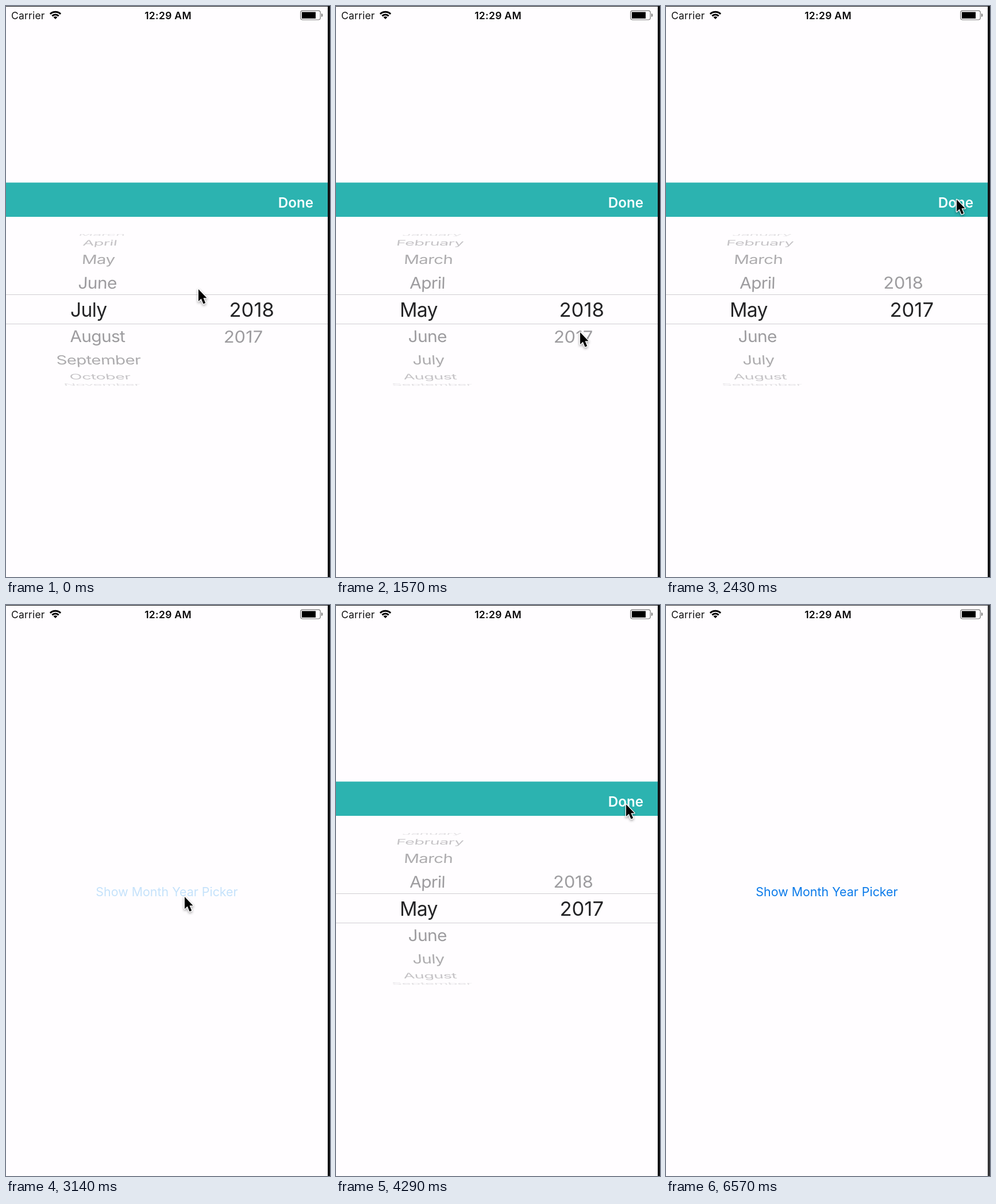
Write an HTML page with a canvas that moves like this. It is 564 by 994 pixels and loops after 7570 ms.

```html
<!DOCTYPE html>
<html lang="en">
<head>
<meta charset="utf-8">
<title>Month Year Picker</title>
<style>
  html, body { margin: 0; width: 100%; height: 100%; overflow: hidden; background: #fffdff; }
  canvas { display: block; width: 564px; height: 994px; }
</style>
</head>
<body>
<canvas id="stage" width="564" height="994"></canvas>
<script>
const ctx = document.getElementById('stage').getContext('2d');
const LOOP = 7570;
const FONT = 'Inter, "Open Sans", sans-serif';
const MONTHS = Array.from({ length: 12 }, (_, i) =>
  new Date(2018, i).toLocaleString('en-US', { month: 'long' }));
const YEARS = ['2018', '2017'];

// Wheel geometry
const MID = 528.5, RADIUS = 131, ROW = 20.9 * Math.PI / 180;
const BAND = { top: 502, bottom: 553 };

// When the hand grabs and lets go of each wheel
const MONTH_DRAG = [430, 1140], YEAR_DRAG = [1570, 2140];

const HOME = { x: 335, y: 493 };
const MOVES = [
  { from: 140, to: 430, x: 245, y: 482 },    // to the months
  { from: 430, to: 1140, x: 267, y: 577 },   // drag down
  { from: 1140, to: 1570, x: 425, y: 568 },  // to the years
  { from: 1570, to: 2000, x: 434, y: 505 },  // drag up
  { from: 2000, to: 2430, x: 506, y: 337 },  // Done
  { from: 2570, to: 3140, x: 311, y: 508 },  // open again
  { from: 3430, to: 4290, x: 505, y: 347 }   // Done
];

const mix = (a, b, p) => a + (b - a) * p;

function ease(t, from, to) {
  const p = Math.min(1, Math.max(0, (t - from) / (to - from)));
  return p * p * (3 - 2 * p);
}

function pointerAt(t) {
  return MOVES.reduce((at, m) => {
    const p = ease(t, m.from, m.to);
    return { x: mix(at.x, m.x, p), y: mix(at.y, m.y, p) };
  }, HOME);
}

// The picture advances seven times per second, on whole 10 ms.
function hold(t) {
  const at = n => Math.round(n * 100 / 7) * 10;
  const n = Math.floor((t + 5) * 7 / 1000);
  return at(n) > t ? at(n - 1) : at(n);
}

function text(str, x, y, size, color, { weight = 400, align = 'center', spacing = 0 } = {}) {
  ctx.font = `${weight} ${size}px ${FONT}`;
  ctx.textAlign = align;
  ctx.letterSpacing = spacing + 'px';
  ctx.fillStyle = color;
  ctx.fillText(str, x, y);
}

function rect(x, y, w, h, color) {
  ctx.fillStyle = color;
  ctx.fillRect(x, y, w, h);
}

function clipped(spans, draw) {
  ctx.save();
  ctx.beginPath();
  spans.forEach(([top, bottom]) => ctx.rect(0, top, 560, bottom - top));
  ctx.clip();
  draw();
  ctx.restore();
}

function wheel(items, pos, { x, axis, size, spacing }) {
  const eachRow = (reach, paint) => items.forEach((label, i) => {
    if (Math.abs(i - pos) > reach) return;
    const a = (i - pos) * ROW;
    ctx.save();
    const color = paint(Math.sin(a), Math.cos(a));
    text(label, 0, size * 0.364, size, color, { spacing });
    ctx.restore();
  });

  // Rows on the drum shrink towards the axis and fade as they turn away.
  clipped([[397, BAND.top], [BAND.bottom, 661]], () => eachRow(4.25, (sin, cos) => {
    const k = 0.823 + 0.068 * cos, arm = x - axis;
    const shear = -arm * 0.068 * sin / RADIUS;
    ctx.transform(k, 0, shear, k * Math.max(cos, 0.2), axis + arm * k, MID + RADIUS * sin);
    return `rgba(20,20,24,${0.08 + 0.36 * cos})`;
  }));

  // The band shows the chosen row enlarged.
  clipped([[BAND.top, BAND.bottom]], () => eachRow(1.5, (sin, cos) => {
    ctx.translate(x, MID + RADIUS * 1.13 * sin);
    ctx.scale(1, cos);
    return '#242426';
  }));
}

function picker(t) {
  rect(0, 307.4, 560, 59.6, '#2cb3b0');
  text('Done', 504.5, 351, 24.2, '#f6ffff', { weight: 600 });
  wheel(MONTHS, mix(6, 4, ease(t, ...MONTH_DRAG)), { x: 143.8, axis: 279, size: 33.7, spacing: -0.7 });
  wheel(YEARS, ease(t, ...YEAR_DRAG), { x: 427.7, axis: 297, size: 34.6, spacing: 0 });
  rect(0, BAND.top, 560, 1, '#cfced2');
  rect(0, BAND.bottom, 560, 1, '#cfced2');
}

function wifi(x, y) {
  const from = -Math.PI * 0.75, to = -Math.PI * 0.25;
  ctx.strokeStyle = ctx.fillStyle = '#000';
  ctx.lineWidth = 3;
  for (const r of [12.8, 8]) {
    ctx.beginPath();
    ctx.arc(x, y, r, from, to);
    ctx.stroke();
  }
  ctx.beginPath();
  ctx.moveTo(x, y);
  ctx.arc(x, y, 4.8, from, to);
  ctx.fill();
}

function battery(x, y) {
  ctx.strokeStyle = '#777';
  ctx.lineWidth = 1.2;
  ctx.beginPath();
  ctx.roundRect(x, y, 34.4, 15.8, 3.5);
  ctx.stroke();
  rect(x + 2.2, y + 2.3, 24, 11.2, '#000');
  ctx.fillStyle = '#777';
  ctx.beginPath();
  ctx.ellipse(x + 36.2, y + 7.9, 2.2, 3, 0, -Math.PI / 2, Math.PI / 2);
  ctx.fill();
}

function statusBar() {
  text('Carrier', 9, 22.5, 17.5, '#111', { align: 'left', spacing: 0.2 });
  wifi(86, 23);
  text('12:29 AM', 282, 22.5, 17.5, '#080808', { weight: 600, spacing: 0.3 });
  battery(512.8, 8.2);
}

function pointer({ x, y }) {
  const arrow = new Path2D('M0 0V21L4.8 16.6 8.5 25.5 12.2 24 8.5 15.3H14.5Z');
  ctx.save();
  ctx.translate(x, y);
  ctx.lineJoin = 'round';
  ctx.lineWidth = 2.6;
  ctx.strokeStyle = '#fff';
  ctx.shadowColor = 'rgba(0,0,0,.4)';
  ctx.shadowBlur = 4;
  ctx.shadowOffsetY = 2;
  ctx.stroke(arrow);
  ctx.shadowColor = 'transparent';
  ctx.fillStyle = '#000';
  ctx.fill(arrow);
  ctx.restore();
}

function draw(time) {
  const t = hold(time);
  const open = t < 2570 || (t >= 3430 && t < 4570);
  const pressed = t >= 3140 && t < 3430;

  rect(0, 0, 564, 994, '#fffdff');
  statusBar();
  if (open) picker(t);
  else text('Show Month Year Picker', 280, 507, 21.4, pressed ? '#c5e2fb' : '#0a7aea');

  const edge = time >= 6570 ? '#343436' : '#111113';
  rect(0, 0, 564, 1, edge);
  rect(560, 0, 4, 994, edge);
  if (time < 5430) pointer(pointerAt(t));
}

const start = performance.now();
function tick() {
  draw((performance.now() - start) % LOOP);
  requestAnimationFrame(tick);
}
tick();
</script>
</body>
</html>
```
